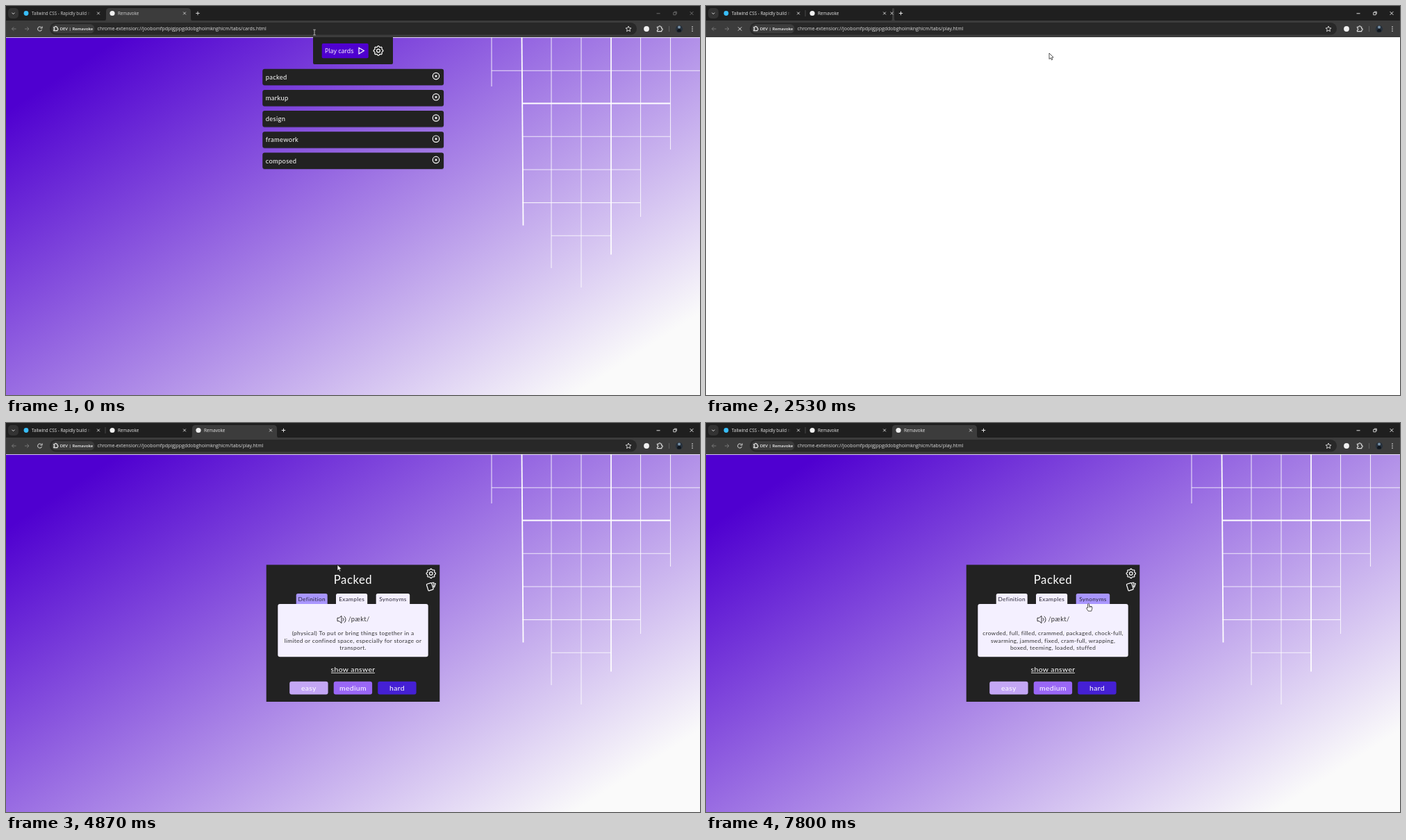
Recreate the animation shown at these times as an HTML page with a canvas. Size 999 px wide and 561 px high, loop 8 s.

```html
<!DOCTYPE html>
<html lang="en">
<head>
<meta charset="utf-8">
<title>Vocabulary cards</title>
<style>
  html, body { margin: 0; width: 100%; height: 100%; overflow: hidden; background: #fff; }
  canvas { display: block; width: 999px; height: 561px; }
</style>
</head>
<body>
<canvas id="stage"></canvas>
<script>
const W = 999, H = 561, LOOP = 8000;
const canvas = document.getElementById('stage');
const ctx = canvas.getContext('2d');
const dpr = window.devicePixelRatio || 1;
canvas.width = W * dpr;
canvas.height = H * dpr;

const UI = '"Open Sans", "Noto Sans", sans-serif';
const ROUND = 'Lato, "Open Sans", sans-serif';
const APP = 'Remavoke';
const URL_BASE = 'chrome-extension://joobomfpdpigjppgddobghoimknghicm/tabs/';
const DARK = '#222222', LIGHT = '#f4f0ff', VIOLET = '#4f00d0';

// Times of the hard changes
const FOCUS = 1470, OPEN = 2530, LOADED = 3880, PAINT = 3980, CARD = 4870, EXAMPLES = 6130, SYNONYMS = 7800;

const PANES = [
  ['(physical) To put or bring things together in a', 'limited or confined space, especially for storage or', 'transport.'],
  ['Three packed data formats are illustrated; packed', 'half 341, packed single 342, and packed double 343.'],
  ['crowded, full, filled, crammed, packaged, chock-full,', 'swarming, jammed, fixed, cram-full, wrapping,', 'boxed, teeming, loaded, stuffed']
];

// Pointer path: time, x, y
const PATH = [
  [30, 444, 38], [420, 468, 60], [650, 488, 75], [800, 488, 72],
  [970, 488, 72], [1100, 494, 68], [3150, 494, 68], [3900, 474.5, 172],
  [4130, 476.5, 200], [4230, 477, 204.5], [5130, 477, 204.5], [5380, 474, 232],
  [5650, 492, 268], [5900, 491, 260.5], [6570, 491, 260.5], [6900, 522, 263], [7230, 550.5, 260.2]
];

const clamp = (v, a = 0, b = 1) => Math.min(b, Math.max(a, v));
const ease = p => p * p * (3 - 2 * p);
const easeOut = p => 1 - (1 - p) ** 3;

function pointerAt(t) {
  const i = PATH.findIndex(k => k[0] > t);
  if (i === 0) return PATH[0].slice(1);
  if (i < 0) return PATH[PATH.length - 1].slice(1);
  const [t0, x0, y0] = PATH[i - 1], [t1, x1, y1] = PATH[i];
  const p = ease((t - t0) / (t1 - t0));
  return [x0 + (x1 - x0) * p, y0 + (y1 - y0) * p];
}

function box(x, y, w, h, r, color) {
  ctx.fillStyle = color;
  ctx.beginPath();
  ctx.roundRect(x, y, w, h, r);
  ctx.fill();
}

function dot(x, y, r, color) {
  ctx.fillStyle = color;
  ctx.beginPath();
  ctx.arc(x, y, r, 0, 7);
  ctx.fill();
}

function ring(x, y, r, color, width, from = 0, to = Math.PI * 2) {
  ctx.strokeStyle = color;
  ctx.lineWidth = width;
  ctx.beginPath();
  ctx.arc(x, y, r, from, to);
  ctx.stroke();
}

function line(points, color, width, closed) {
  ctx.strokeStyle = color;
  ctx.lineWidth = width;
  ctx.beginPath();
  points.forEach(([x, y]) => ctx.lineTo(x, y));
  if (closed) ctx.closePath();
  ctx.stroke();
}

function text(str, x, y, size, color, { family = UI, weight = 400, align = 'left' } = {}) {
  ctx.font = `${weight} ${size}px ${family}`;
  ctx.letterSpacing = family === ROUND ? `${size * 0.035}px` : '0px';
  ctx.textAlign = align;
  ctx.fillStyle = color;
  ctx.fillText(str, x, y);
}

const round = (str, x, y, size, color, align = 'center') =>
  text(str, x, y, size, color, { family: ROUND, align });

function cross(x, y, r, color, width = 1) {
  line([[x - r, y - r], [x + r, y + r]], color, width);
  line([[x + r, y - r], [x - r, y + r]], color, width);
}

function plus(x, y, r, color) {
  line([[x - r, y], [x + r, y]], color, 1);
  line([[x, y - r], [x, y + r]], color, 1);
}

function gear(x, y, r) {
  const pts = Array.from({ length: 64 }, (_, i) => {
    const a = i / 64 * Math.PI * 2;
    const d = r * (0.91 + 0.09 * clamp(2 * Math.cos(8 * a), -1, 1));
    return [x + d * Math.cos(a), y + d * Math.sin(a)];
  });
  line(pts, '#fff', 1.2, true);
  ring(x, y, r * 0.35, '#fff', 1.2);
}

function puzzle(x, y, s, color) {
  ctx.save();
  ctx.translate(x, y);
  ctx.scale(s, s);
  ctx.strokeStyle = color;
  ctx.lineWidth = 1.1 / s;
  ctx.beginPath();
  ctx.moveTo(-4, -3);
  ctx.lineTo(-1.5, -3);
  ctx.arc(0, -3.3, 1.4, Math.PI, 0);
  ctx.lineTo(3, -3);
  ctx.lineTo(3, -0.7);
  ctx.arc(3.3, 0.7, 1.4, -Math.PI / 2, Math.PI / 2);
  ctx.lineTo(3, 4);
  ctx.lineTo(-4, 4);
  ctx.lineTo(-4, 2);
  ctx.arc(-3.7, 0.6, 1.4, Math.PI / 2, -Math.PI / 2, true);
  ctx.closePath();
  ctx.stroke();
  ctx.restore();
}

function star(x, y, r) {
  const pts = Array.from({ length: 10 }, (_, i) => {
    const a = -Math.PI / 2 + i * Math.PI / 5, d = i % 2 ? r * 0.45 : r;
    return [x + d * Math.cos(a), y + d * Math.sin(a)];
  });
  line(pts, '#e0e0e0', 0.9, true);
}

function reload(x, y) {
  ring(x, y, 3.1, '#d8d8d8', 1, 0.3, 5.5);
  line([[x + 3.4, y - 3.6], [x + 3.4, y - 1], [x + 0.8, y - 1]], '#d8d8d8', 1);
}

function tabShape(x, w) {
  const r = Math.min(5, w / 2), f = 3.5;
  ctx.fillStyle = '#3c3c3c';
  ctx.beginPath();
  ctx.moveTo(x - f, 21.5);
  ctx.quadraticCurveTo(x, 21.5, x, 18);
  ctx.lineTo(x, 3 + r);
  ctx.quadraticCurveTo(x, 3, x + r, 3);
  ctx.lineTo(x + w - r, 3);
  ctx.quadraticCurveTo(x + w, 3, x + w, 3 + r);
  ctx.lineTo(x + w, 18);
  ctx.quadraticCurveTo(x + w, 21.5, x + w + f, 21.5);
  ctx.fill();
}

function tab(x, w, active, title, color, icon) {
  if (active) tabShape(x, w);
  ctx.save();
  ctx.beginPath();
  ctx.rect(x, 0, Math.max(0, w - 17), 21);
  ctx.clip();
  icon(x + 9, 10.5);
  const fade = ctx.createLinearGradient(x + 95, 0, x + 104, 0);
  fade.addColorStop(0, color);
  fade.addColorStop(1, 'transparent');
  text(title, x + 17, 12.9, 6.25, fade, { weight: 500 });
  ctx.restore();
  cross(Math.max(x + w - 9, x - 0.5), 10.5, 1.9, color, 0.9);
}

function drawTabs(t) {
  const focused = t >= FOCUS, opened = t >= OPEN;
  const ink = focused ? '#e3e3e3' : '#cfcfcf';
  box(0, 0, W, 21, 0, '#1f1f1f');
  box(3, 3, 15, 15, 5, '#333333');
  line([[8.5, 9.7], [10.5, 11.7], [12.5, 9.7]], '#e0e0e0', 1);

  const mark = (x, y) => dot(x, y, 3.6, '#f0f0f0');
  tab(20, 122, false, 'Tailwind CSS - Rapidly build modern', ink, (x, y) => dot(x, y, 3.4, '#38bdf8'));
  tab(144, 122, !opened, APP, ink, mark);

  let plusX = 276;
  if (opened) {
    line([[143, 6], [143, 15]], '#4a4a4a', 1);
    const w = Math.max(3, 122 * easeOut(clamp((t - 2560) / 220)));
    tab(268, w, true, APP, ink, (x, y) => {
      if (t < LOADED) {
        const a = t / 160;
        ring(x, y, 3.2, '#8ab4f8', 1, a, a + 3.6);
      } else {
        dot(x, y, 2.4 + 1.2 * clamp((t - 3900) / 150), '#f0f0f0');
      }
    });
    plusX = Math.max(276, 277.5 + w);
  }
  plus(plusX, 10.5, 2.7, ink);

  const ctl = focused ? '#f5f5f5' : '#777777';
  line([[936.5, 10.8], [941.5, 10.8]], ctl, 0.9);
  line([[960.7, 9.3], [964.2, 9.3], [964.2, 12.8], [960.7, 12.8]], ctl, 0.8, true);
  line([[961.8, 8.2], [965.3, 8.2], [965.3, 11.7]], ctl, 0.8);
  cross(987, 10.5, 2.4, ctl, 0.9);
}

function drawToolbar(t) {
  box(0, 21, W, 24, 0, '#3c3c3c');
  const nav = (x, d) => {
    line([[x - 3, 33], [x + 3, 33]], '#777', 1);
    line([[x + d * 0.3, 30.3], [x + d * 3, 33], [x + d * 0.3, 35.7]], '#777', 1);
  };
  nav(11.5, -1);
  nav(30, 1);
  if (t >= OPEN && t < LOADED) cross(48.7, 33, 2.6, '#d8d8d8');
  else reload(48.7, 33);

  box(63, 24, 845, 17.5, 8.75, '#282828');
  box(65.5, 26.3, 62, 13, 6.5, '#3c3c3c');
  puzzle(71.7, 32.7, 0.72, '#e8e8e8');
  text('DEV | ' + APP, 77.7, 35.1, 5.95, '#eeeeee', { weight: 600 });
  text(URL_BASE + (t < OPEN ? 'cards' : 'play') + '.html', 131.6, 35.2, 6.95, '#dcdcdc');

  star(896, 33.2, 4.2);
  dot(922, 33, 3.9, '#f0f0f0');
  puzzle(941, 33, 0.9, '#dddddd');
  line([[954.5, 29], [954.5, 37]], '#606060', 1);
  dot(969, 33, 5.2, '#28323d');
  dot(969, 30.5, 2, '#7891a8');
  box(966.2, 33, 5.6, 4.4, [2.5, 2.5, 1, 1], '#10161d');
  [-3, 0, 3].forEach(d => dot(988, 33 + d, 0.85, '#dddddd'));
}

function drawBackdrop() {
  // Gradient along a unit direction, measured from the page's top-left corner
  const dx = 0.545, dy = 0.838;
  const g = ctx.createLinearGradient(90 * dx, 45 + 90 * dy, 879 * dx, 45 + 879 * dy);
  g.addColorStop(0, VIOLET);
  g.addColorStop(1, '#fafafa');
  box(0, 45, W, H - 45, 0, g);

  const c = 'rgba(255,255,255,.8)';
  [[699, 116], [785, 378], [828, 406], [913.5, 304], [956.5, 207]]
    .forEach(([x, y]) => line([[x, 45], [x, y]], c, 1.1));
  line([[742.5, 45], [744.5, 316.5]], '#fff', 1.8);
  line([[871, 45], [871, 358.5]], '#fff', 1.7);
  [[93.3, 699, 999], [188.3, 743, 956], [236, 743, 913], [283.6, 743, 913], [331.3, 785, 871]]
    .forEach(([y, a, b]) => line([[a, y], [b, y]], c, 1.1));
  line([[743, 140.5], [956, 140.5]], '#fff', 1.8);
  box(0, 45, W, 1, 0, 'rgba(255,255,255,.75)');
}

function drawList(hover) {
  box(442, 45, 115, 39, [0, 0, 2, 2], DARK);
  box(454.7, 54, 67, 21.2, 2, hover ? '#480ca8' : VIOLET);
  text('Play cards', 459, 68, 8.83, '#fff');
  line([[508, 60.3], [515.3, 64.6], [508, 69]], '#fff', 1.2, true);
  gear(536, 64.5, 6.8);
  ['packed', 'markup', 'design', 'framework', 'composed'].forEach((word, i) => {
    const y = 90.7 + i * 30.2;
    box(369.3, y + 1, 260.8, 23.4, 3, 'rgba(0,0,0,.18)');
    box(369.3, y, 260.8, 23.5, 3, DARK);
    round(word, 373.7, y + 15, 9.36, '#fff', 'left');
    ring(619, y + 10.4, 4.7, '#fff', 1.2);
    cross(619, y + 10.4, 1.5, '#fff', 1.1);
  });
}

function speaker(x, y) {
  line([[x - 6, y - 2.3], [x - 3.5, y - 2.3], [x, y - 5.3], [x, y + 5.3], [x - 3.5, y + 2.3], [x - 6, y + 2.3]], '#222', 0.9, true);
  ring(x, y, 3, '#222', 0.9, -0.9, 0.9);
  ring(x, y, 6, '#222', 0.9, -0.9, 0.9);
}

function cardsIcon(x, y) {
  ctx.save();
  ctx.translate(x - 1.5, y + 0.3);
  ctx.rotate(-0.3);
  ctx.strokeStyle = '#fff';
  ctx.lineWidth = 1.2;
  ctx.beginPath();
  ctx.roundRect(-3.8, -5, 7.6, 10, 1);
  ctx.stroke();
  ctx.restore();
  line([[x + 1.5, y - 5.6], [x + 4, y - 5.6], [x + 4, y + 1]], '#fff', 1.2);
  line([[x + 5.2, y - 4.6], [x + 6.6, y - 4], [x + 4.6, y + 1.5]], '#fff', 1.1);
}

function drawCard(pane) {
  const lines = PANES[pane];
  const h = 166.4 + lines.length * 10.4;
  const top = 303.2 - h / 2, bottom = top + h, mid = 499.5;
  box(374.7, top, 249.6, h, 0, DARK);
  round('Packed', mid, top + 27.3, 16.65, '#fff');
  gear(611.8, top + 12.6, 6.6);
  cardsIcon(611.8, top + 31.5);

  [['Definition', 417.7, 45], ['Examples', 475, 45.2], ['Synonyms', 532.7, 48.5]].forEach(([name, x, w], i) => {
    box(x, top + 41.7, w, 15, [2.5, 2.5, 0, 0], i === pane ? '#a996ff' : LIGHT);
    round(name, x + w / 2, top + 52.2, 8.32, '#2c2838');
  });

  box(391.3, top + 56.5, 216.4, 45.2 + lines.length * 10.4, 3, LIGHT);
  speaker(483, top + 79);
  round('/pækt/', 508, top + 81.7, 9.36, '#333');
  lines.forEach((s, i) => round(s, mid, top + 102 + i * 10.4, 8.32, '#333'));

  round('show answer', mid, bottom - 43, 10.4, '#fff');
  box(468, bottom - 41.8, 63, 0.8, 0, '#fff');
  [['easy', '#c4a7f5'], ['medium', '#9a67f6'], ['hard', '#4520d4']].forEach(([name, color], i) => {
    const x = 408.2 + i * 63.5;
    box(x, bottom - 29.2, 55.4, 18.7, 3, color);
    round(name, x + 27.7, bottom - 16.3, 10.4, '#fff');
  });
}

function arrow(x, y) {
  const pts = [[0, 0], [0, 8.6], [2, 6.8], [3.4, 9.8], [4.8, 9.2], [3.5, 6.3], [6.1, 6.1]];
  ctx.fillStyle = '#fff';
  ctx.beginPath();
  pts.forEach(([a, b]) => ctx.lineTo(x + a, y + b));
  ctx.fill();
  line(pts.map(([a, b]) => [x + a, y + b]), '#111', 0.7, true);
}

function hand(x, y) {
  ctx.fillStyle = '#fff';
  ctx.strokeStyle = '#111';
  ctx.lineWidth = 0.7;
  ctx.beginPath();
  ctx.moveTo(x - 1, y + 6.5);
  ctx.lineTo(x - 1, y + 0.8);
  ctx.quadraticCurveTo(x, y - 0.7, x + 1, y + 0.8);
  ctx.lineTo(x + 1, y + 3.8);
  ctx.lineTo(x + 4.6, y + 4.5);
  ctx.quadraticCurveTo(x + 5.7, y + 4.8, x + 5.5, y + 6.6);
  ctx.lineTo(x + 4.3, y + 11);
  ctx.lineTo(x - 0.3, y + 11);
  ctx.lineTo(x - 2.8, y + 7.2);
  ctx.quadraticCurveTo(x - 2.8, y + 5.4, x - 1, y + 6.5);
  ctx.closePath();
  ctx.fill();
  ctx.stroke();
  [1, 2.6, 4.1].forEach(d => line([[x + d, y + 4], [x + d, y + 6.2]], '#111', 0.5));
}

function iBeam(x, y) {
  line([[x, y - 3.6], [x, y + 3.6]], '#ddd', 0.8);
  [-3.8, 3.8].forEach(d => line([[x - 1.8, y + d], [x + 1.8, y + d]], '#ddd', 0.7));
}

function drawPointer(t, x, y) {
  const overTabs = t >= CARD && y > 246 && y < 266 && (t >= 5900 || y < 261);
  if (y < 42) iBeam(x, y);
  else if (overTabs) hand(x, y);
  else arrow(x, y);
}

function draw(t) {
  const [x, y] = pointerAt(t);
  ctx.setTransform(dpr, 0, 0, dpr, 0, 0);
  box(0, 0, W, H, 0, '#fff');
  if (t < OPEN || t >= PAINT) drawBackdrop();
  if (t < OPEN) drawList(x > 454 && x < 522 && y > 54 && y < 76);
  if (t >= CARD) drawCard(t >= SYNONYMS ? 2 : t >= EXAMPLES ? 1 : 0);
  drawTabs(t);
  drawToolbar(t);
  drawPointer(t, x, y);
}

const start = performance.now();
function frame() {
  draw((performance.now() - start) % LOOP);
  requestAnimationFrame(frame);
}
frame();
</script>
</body>
</html>
```
